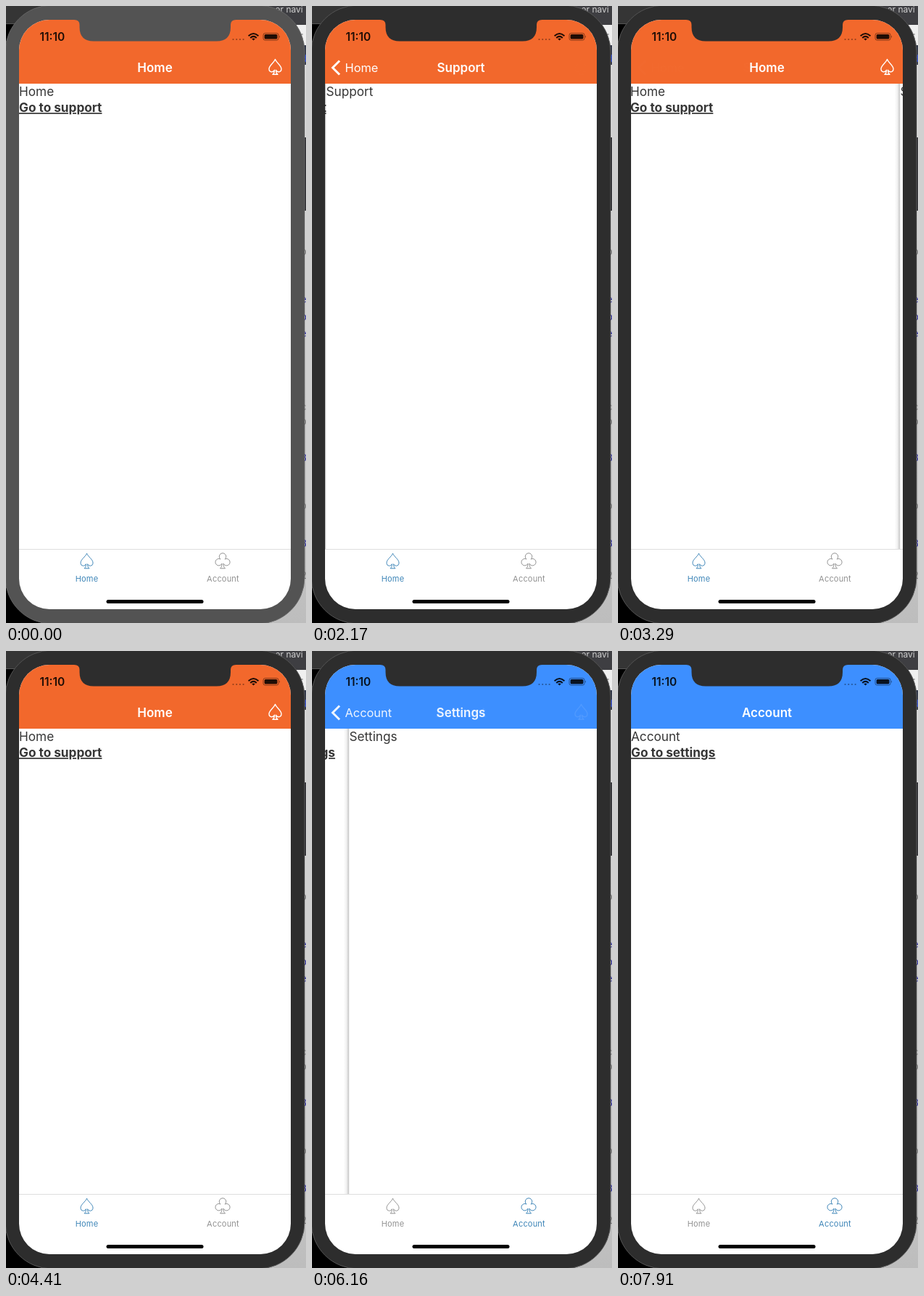
An HTML page for the animation above (8000 ms loop, 414 by 850 pixels).

```html
<!DOCTYPE html>
<html lang="en">
<head>
<meta charset="utf-8">
<title>Tab and stack navigation</title>
<style>
  html, body { margin: 0; width: 100%; height: 100%; overflow: hidden; background: #000; }
  svg { display: block; width: 414px; height: 850px; font-family: Inter, "Liberation Sans", sans-serif; }
  .body { font-size: 17.2px; fill: #363636; }
  .link { font-weight: 700; text-decoration: underline; }
  .title { font-size: 17px; font-weight: 600; fill: #fff; text-anchor: middle; }
  .back { font-size: 16.4px; fill: #fff; }
  .tab { font-size: 11px; letter-spacing: .2px; text-anchor: middle; stroke: none; }
  .icon { fill: none; stroke-linejoin: round; }
</style>
</head>
<body>
<svg viewBox="0 0 414 850">
  <defs>
    <clipPath id="screenClip"><rect x="18" y="19" width="375" height="812" rx="42"/></clipPath>
    <clipPath id="contentClip"><rect x="18" y="107" width="375" height="641"/></clipPath>
    <linearGradient id="edgeShadow">
      <stop offset="0" stop-color="#000" stop-opacity="0"/>
      <stop offset=".5" stop-color="#000" stop-opacity=".05"/>
      <stop offset="1" stop-color="#000" stop-opacity=".24"/>
    </linearGradient>
    <linearGradient id="floor" x2="0" y2="1">
      <stop offset="0" stop-color="#f0f0f0"/>
      <stop offset="1" stop-color="#bdbdbd"/>
    </linearGradient>
    <path id="spade" d="M0 .5C-1.5 5-8.5 9-8.5 13.6C-8.5 16-7 17.7-5 17.7C-3.1 17.7-1.7 16.7-1 15.2C-1 18-1.8 20-3.5 21.3H3.5C1.8 20 1 18 1 15.2C1.7 16.7 3.1 17.7 5 17.7C7 17.7 8.5 16 8.5 13.6C8.5 9 1.5 5 0 .5Z"/>
    <path id="club" d="M-1 14.5A4.7 4.7 0 1 1-3 8.6A4.7 4.7 0 1 1 3 8.6A4.7 4.7 0 1 1 1 14.5C1 18 1.8 20 3.5 21.3H-3.5C-1.8 20-1 18-1 14.5Z"/>
  </defs>

  <!-- desktop behind the phone -->
  <rect width="414" height="850" fill="#000"/>
  <rect width="200" height="24" fill="#353535"/>
  <rect y="24" width="200" height="1" fill="#555"/>
  <rect x="340" width="74" height="26" fill="#3e3e42"/>
  <rect x="340" y="26" width="74" height="824" fill="url(#floor)"/>
  <rect x="400" y="54" width="14" height="27" fill="#343a4a"/>
  <rect x="400" y="181" width="14" height="101" fill="#303034"/>
  <text x="371.5" y="9" font-size="12" fill="#d0d0d0">er navi</text>
  <g id="fragments" font-size="13"></g>

  <!-- phone -->
  <rect id="bezel" x="-1" y="-1" width="413" height="852" rx="64" stroke-width="1"/>
  <g clip-path="url(#screenClip)">
    <rect x="18" y="19" width="375" height="812" fill="#fff"/>
    <g clip-path="url(#contentClip)">
      <g id="rootCard">
        <rect x="18" y="107" width="375" height="641" fill="#fff"/>
        <text id="rootText" class="body" x="18" y="124"></text>
        <text id="linkText" class="body link" x="18" y="146"></text>
      </g>
      <g id="detailCard">
        <rect x="10" y="107" width="8" height="641" fill="url(#edgeShadow)"/>
        <rect x="18" y="107" width="375" height="641" fill="#fff"/>
        <text id="detailText" class="body" x="18" y="124"></text>
      </g>
    </g>

    <rect id="header" x="18" y="19" width="375" height="88"/>
    <text id="rootTitle" class="title" x="205.5" y="91"></text>
    <text id="detailTitle" class="title" x="205.5" y="91"></text>
    <g id="backButton">
      <path d="M38 75.5L28.5 85L38 94.5" fill="none" stroke="#fff" stroke-width="3"/>
      <text id="backText" class="back" x="45.5" y="91"></text>
    </g>
    <use id="headerIcon" class="icon" href="#spade" x="371.5" y="73" stroke="#fff" stroke-width="1.4"/>

    <rect x="18" y="748" width="375" height="1" fill="#dedede"/>
    <g id="homeTab">
      <use class="icon" href="#spade" x="111.5" y="753.5"/>
      <text class="tab" x="111.5" y="793">Home</text>
    </g>
    <g id="accountTab">
      <use class="icon" href="#club" x="299" y="753.5"/>
      <text class="tab" x="299.5" y="793">Account</text>
    </g>
    <rect x="138.5" y="818" width="134" height="5" rx="2.5" fill="#000"/>

    <g opacity=".87">
      <text x="46.5" y="47.5" font-size="15.5" font-weight="600">11:10</text>
      <g opacity=".45">
        <circle cx="313.5" cy="46" r="1.1"/><circle cx="318.2" cy="46" r="1.1"/>
        <circle cx="322.9" cy="46" r="1.1"/><circle cx="327.6" cy="46" r="1.1"/>
      </g>
      <g fill="none" stroke="#000" stroke-width="2.1">
        <path d="M334.6 41.2Q341.5 34.8 348.4 41.2M337.2 43.9Q341.5 39.8 345.8 43.9"/>
      </g>
      <path d="M341.5 47.6L339.2 45.3Q341.5 43.5 343.8 45.3Z"/>
      <rect x="355" y="37.5" width="21" height="9.6" rx="2.6" fill="none" stroke="#000" stroke-opacity=".5"/>
      <rect x="356.6" y="39" width="17.8" height="6.6" rx="1.5"/>
      <path d="M377.2 40.6Q379 42.3 377.2 44Z" opacity=".6"/>
    </g>
  </g>
  <path id="notch" d="M94 17V19Q101.500 19 101.500 26V29Q101.500 48.500 121 48.500H290.500Q310 48.500 310 29V26Q310 19 317.500 19V17Z"/>
</svg>

<script>
const LOOP = 8000;
const WIDTH = 375;
const FOCUS_AT = 560;
const SWITCH_TAB_AT = 4480;
const ICON_FADE = { start: 7770, length: 140 };
const ACTIVE = '#3f86b8';
const INACTIVE = '#929292';

const TABS = {
  home: { root: 'Home', detail: 'Support', link: 'Go to support', color: '#f2682c', push: 1750, pop: 2924 },
  account: { root: 'Account', detail: 'Settings', link: 'Go to settings', color: '#3d8fff', push: 5940, pop: 7000 }
};

const el = Object.fromEntries([...document.querySelectorAll('[id]')].map(node => [node.id, node]));

// Slivers of the code editor showing past the phone's right edge
const BLUE = '#2525a0', GREEN = '#28704a', GRAY = '#777';
[[45, ':', GRAY], [77, 'd', '#3a55d8'], [301, 't', GREEN], [343, 'o', GRAY],
 [409, 'e', BLUE], [433, 'p', BLUE], [456, 'e', BLUE], [536, 't', GREEN],
 [557, 'c', GRAY], [577, 'o', GRAY], [627, '8', BLUE], [651, 't', GREEN],
 [693, 'o', GRAY], [745, '8', BLUE], [767, 't', GREEN], [789, '2', GRAY]
].forEach(([y, letter, fill]) => {
  const text = document.createElementNS('http://www.w3.org/2000/svg', 'text');
  text.setAttribute('x', 407);
  text.setAttribute('y', y);
  text.setAttribute('fill', fill);
  text.textContent = letter;
  el.fragments.append(text);
});

const clamp = v => Math.min(1, Math.max(0, v));
const set = (node, name, value) => node.setAttribute(name, value);
const say = (node, text) => { if (node.textContent !== text) node.textContent = text; };

// Critically damped spring, stiffness 1000 and mass 3
function spring(ms) {
  const x = Math.sqrt(1000 / 3) * Math.max(0, ms) / 1000;
  return 1 - Math.exp(-x) * (1 + x);
}

function paintTab(node, active) {
  set(node, 'fill', active ? ACTIVE : INACTIVE);
  set(node, 'stroke', active ? ACTIVE : INACTIVE);
}

function render(t) {
  const onHome = t < SWITCH_TAB_AT;
  const tab = onHome ? TABS.home : TABS.account;
  const progress = spring(t - tab.push) - spring(t - tab.pop);

  const focused = t >= FOCUS_AT;
  const bezel = focused ? '#2d2d2d' : '#535353';
  set(el.bezel, 'fill', bezel);
  set(el.bezel, 'stroke', focused ? '#545454' : '#646464');
  set(el.notch, 'fill', bezel);

  say(el.rootText, tab.root);
  say(el.linkText, tab.link);
  say(el.detailText, tab.detail);
  say(el.rootTitle, tab.root);
  say(el.detailTitle, tab.detail);
  say(el.backText, tab.root);
  set(el.header, 'fill', tab.color);

  set(el.rootCard, 'transform', `translate(${-0.3 * WIDTH * progress})`);
  set(el.detailCard, 'transform', `translate(${WIDTH * (1 - progress)})`);
  set(el.detailCard, 'visibility', progress > 0.001 ? 'visible' : 'hidden');

  set(el.rootTitle, 'opacity', 1 - progress);
  set(el.detailTitle, 'opacity', progress);
  set(el.backButton, 'opacity', progress);
  const faded = clamp((t - ICON_FADE.start) / ICON_FADE.length);
  set(el.headerIcon, 'opacity', (1 - progress) * (1 - faded));

  paintTab(el.homeTab, onHome);
  paintTab(el.accountTab, !onHome);
}

const startTime = performance.now();
function tick() {
  render((performance.now() - startTime) % LOOP);
  requestAnimationFrame(tick);
}
tick();
</script>
</body>
</html>
```
